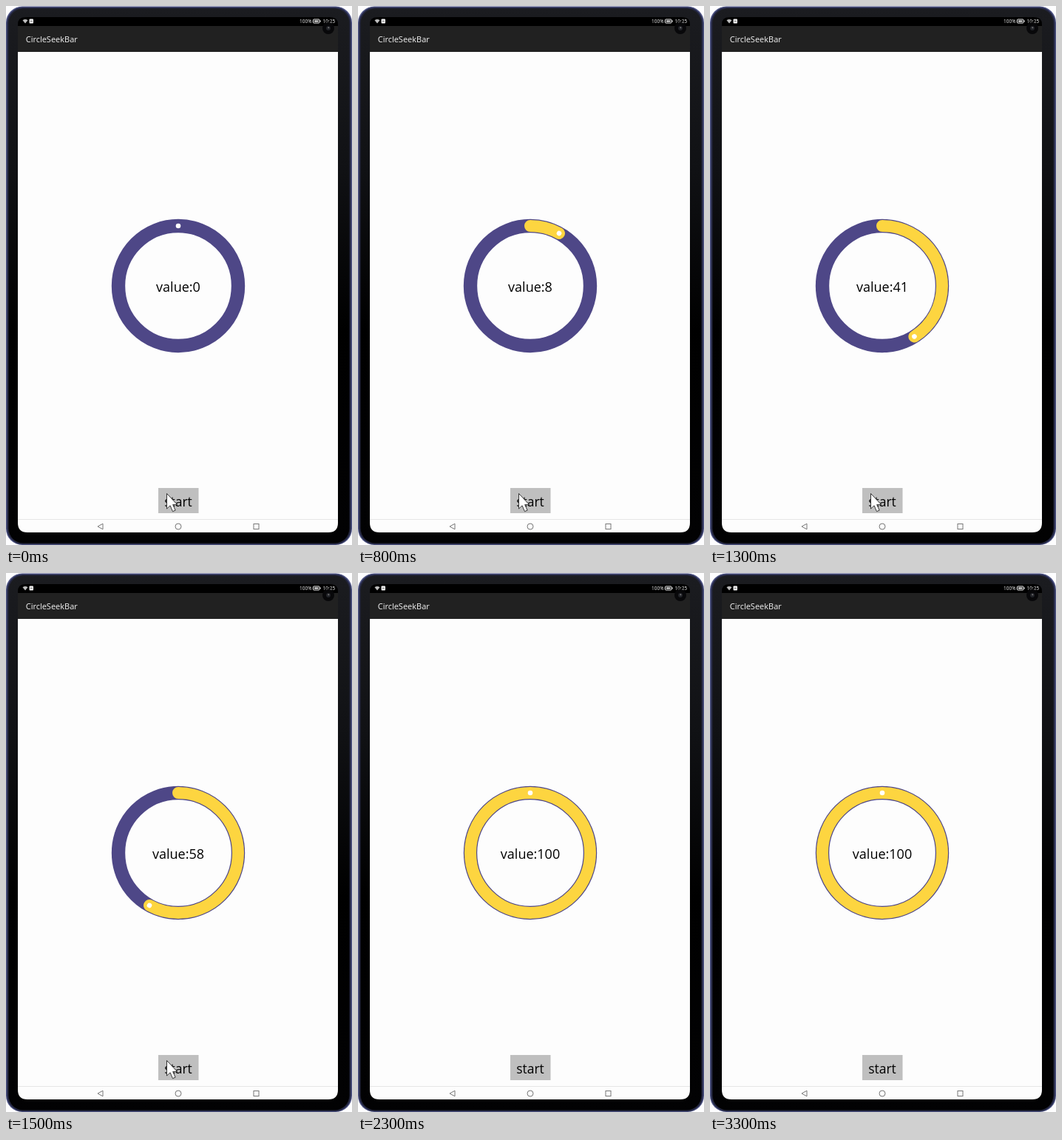
Write an HTML page that moves like this. It is 468x728 px and loops after 3400 ms.

```html
<!DOCTYPE html>
<html lang="en">
<head>
<meta charset="utf-8">
<title>CircleSeekBar</title>
<style>
  html, body { margin: 0; width: 100%; height: 100%; overflow: hidden; background: #fdfdfe; }
  svg { display: block; font-family: "Open Sans", "Noto Sans", sans-serif; }
</style>
</head>
<body>
<svg width="468" height="728" viewBox="0 0 468 728">
  <defs>
    <linearGradient id="bezel" x2="0" y2="1">
      <stop offset="0" stop-color="#1b1c20"/>
      <stop offset=".3" stop-color="#101114"/>
      <stop offset=".6" stop-color="#000"/>
      <stop offset="1" stop-color="#020203"/>
    </linearGradient>
  </defs>

  <!-- tablet -->
  <rect x="0" y="0.5" width="468" height="727.5" rx="22" fill="#4a5080"/>
  <rect x="1.5" y="2" width="465" height="725" rx="21" fill="#23263f"/>
  <rect x="3.5" y="3.5" width="461" height="722" rx="20" fill="url(#bezel)"/>
  <path d="M16 62H449V698Q449 711 436 711H29Q16 711 16 698Z" fill="#fdfdfd"/>
  <path d="M16 27V25Q16 15 26 15H439Q449 15 449 25V27Z"/>
  <path d="M16 27H449V62H16Z" fill="#212121"/>

  <!-- status bar -->
  <g fill="#eee" font-size="6.5">
    <path d="M22.5 19.2Q26 16.6 29.5 19.2L26 23.5Z" opacity=".8"/>
    <rect x="31.5" y="17.5" width="5.5" height="6" rx="1"/>
    <path d="M32.8 20.5h3" stroke="#555" stroke-width=".8"/>
    <text x="397" y="23.3">100%</text>
    <rect x="415.5" y="18" width="8.5" height="5" rx="1" fill="none" stroke="#eee"/>
    <path d="M417 19.5h5.5v2H417zM424.5 19.5h1.2v2h-1.2z"/>
    <text x="428.5" y="23.3">10:25</text>
  </g>
  <circle cx="436" cy="30" r="8" fill="#08080a"/>
  <circle cx="436" cy="30" r="3" fill="#222429"/>
  <circle cx="436.3" cy="29.3" r="1" fill="#777"/>
  <text x="26.7" y="49" font-size="11" fill="#f4f4f4">CircleSeekBar</text>

  <!-- navigation bar -->
  <path d="M16 693.5H449" stroke="#e6e6e6"/>
  <g fill="none" stroke="#777">
    <path d="M131 699.2V706.8L124 703Z"/>
    <circle cx="233" cy="703" r="4"/>
    <rect x="335" y="699.5" width="7" height="7"/>
  </g>

  <!-- seek bar -->
  <g fill="none" transform="rotate(-90 233 378)">
    <circle cx="233" cy="378" r="81" stroke="#4e4787" stroke-width="18.4"/>
    <circle id="arc" cx="233" cy="378" r="81" stroke="#fdd540" stroke-width="16"
      stroke-linecap="round" pathLength="100"/>
  </g>
  <circle id="dot" cx="233" cy="297" r="3.3" fill="#fff"/>
  <text id="label" x="233" y="385.5" font-size="18" text-anchor="middle"></text>

  <rect x="206" y="651" width="54.5" height="34" fill="#bfbfbf"/>
  <text x="233" y="675.5" font-size="17.5" text-anchor="middle">start</text>
  <path id="cursor" d="M0 0V20.5L4.6 16.3L8 24.2L11.6 22.6L8.2 15H14.2Z"
    fill="#fff" stroke="#222" stroke-width=".9" stroke-linejoin="round"/>
</svg>
<script>
const LOOP = 3400, STEP = 100;
const [arc, dot, label, cursor] =
  ["arc", "dot", "label", "cursor"].map(id => document.getElementById(id));

const clamp = x => Math.min(1, Math.max(0, x));
const ease = x => (1 - Math.cos(Math.PI * x)) / 2;

// The run stalls after 1500 ms, resumes a little slower, then snaps to the end.
function progress(t) {
  if (t >= 2300) return 1;
  if (t >= 1700) return 0.702 + 0.00047 * (t - 2000);
  return clamp(0.186 + 0.000522 * (Math.min(t, 1500) - 800));
}

function draw(now) {
  const t = Math.floor(now % LOOP / STEP) * STEP;
  const value = Math.floor(100 * ease(progress(t)));
  label.textContent = "value:" + value;
  arc.setAttribute("stroke-dasharray", value + " 100");
  arc.setAttribute("visibility", value ? "visible" : "hidden");
  dot.setAttribute("transform", `rotate(${value * 3.6} 233 378)`);

  const leave = clamp((t - 1700) / 200);
  cursor.setAttribute("transform", `translate(${217.5 - 45 * leave} ${658.5 + 75 * leave})`);
  requestAnimationFrame(draw);
}
draw(performance.now());
</script>
</body>
</html>
```
